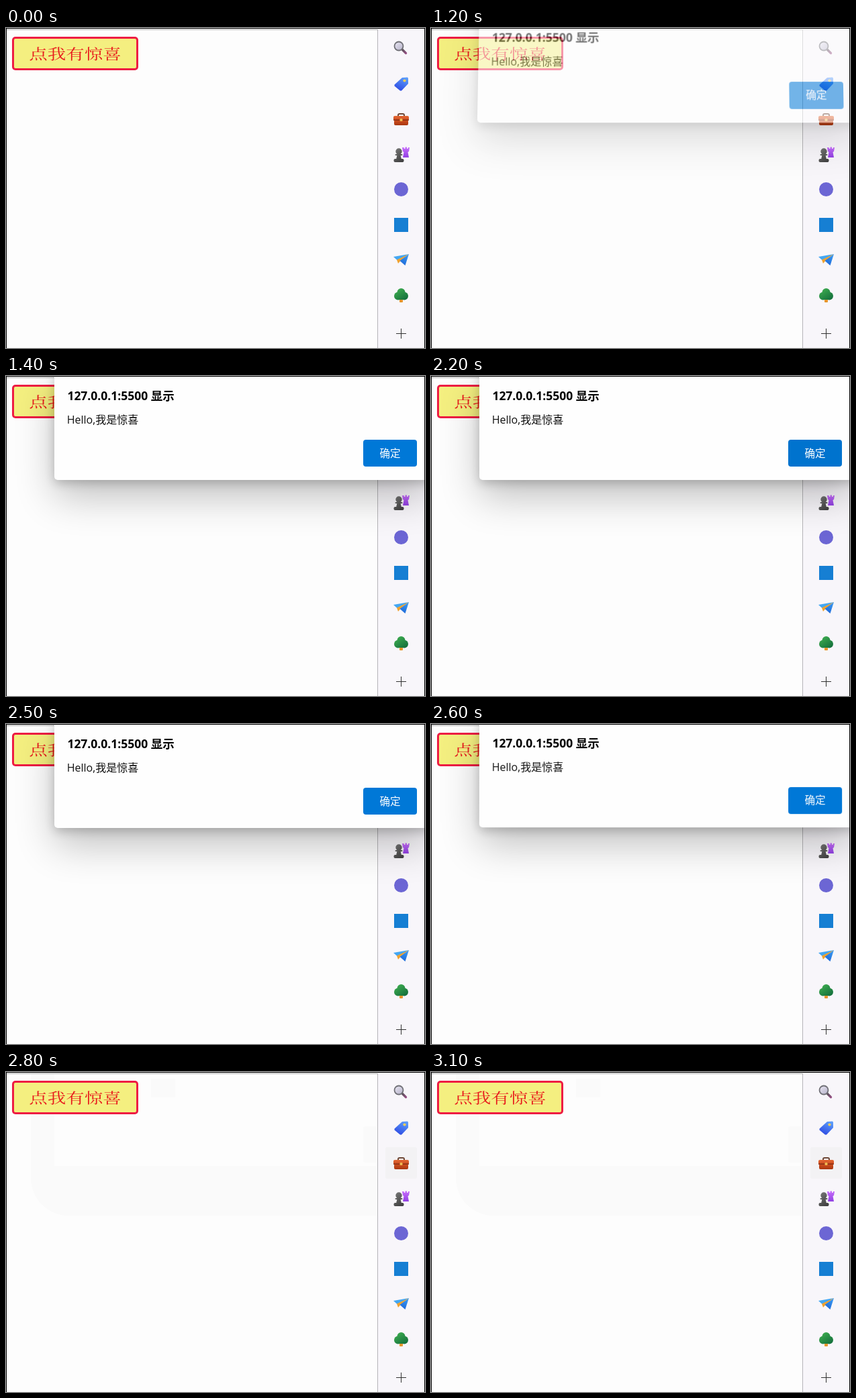
Animation of 624 by 477 pixels, one loop 4.2 s. Source, as an HTML page with a canvas:

```html
<!DOCTYPE html>
<html lang="zh">
<head>
<meta charset="utf-8">
<title>Alert</title>
<style>
  html, body { margin: 0; width: 100%; height: 100%; overflow: hidden; }
  #stage { position: relative; width: 624px; height: 477px; overflow: hidden; }
  canvas { position: absolute; left: 0; top: 0; }
  #dialog {
    position: absolute; left: 72px; top: -6px; width: 560px; height: 161px;
    border-radius: 5px; background: #fefefe; transform-origin: 50% 0;
    box-shadow: 0 25.6px 57.6px rgba(0,0,0,.24), 0 4.8px 14.4px rgba(0,0,0,.2);
  }
  #dialog svg { display: block; }
  #dialog text { font-family: "Open Sans", "Noto Sans CJK SC", "Noto Sans CJK", sans-serif; }
  #frame {
    position: absolute; inset: 0; border: 1px solid #000; border-bottom: 0;
  }
</style>
</head>
<body>
<div id="stage">
  <canvas id="page" width="624" height="477"></canvas>
  <div id="dialog">
    <svg width="560" height="161" viewBox="72 -6 560 161">
      <text x="91.4" y="36" font-size="17.5" font-weight="700">127.0.0.1:5500 显示</text>
      <text x="90.7" y="71" font-size="16" fill="#111">Hello,我是惊喜</text>
      <rect id="ok" x="532" y="95" width="80" height="40" rx="4"/>
      <text x="572" y="120.5" font-size="15.5" fill="#fff" text-anchor="middle">确定</text>
    </svg>
  </div>
  <div id="frame"></div>
</div>
<script>
const LOOP = 4200;
const ctx = document.getElementById('page').getContext('2d');
const dialog = document.getElementById('dialog');
const ok = document.getElementById('ok');

// Dialog poses: start time, opacity, lift (1 = raised and tilted)
const poses = [
  [0, 0, 1], [1200, .55, 1], [1300, .98, .06], [1400, 1, 0],
  [2600, 1, .06], [2700, .47, .93], [2800, 0, 1]
];

function box(x, y, w, h, fill, r = 0) {
  ctx.fillStyle = fill;
  ctx.beginPath();
  ctx.roundRect(x, y, w, h, r);
  ctx.fill();
}
function dot(x, y, r, fill) {
  ctx.fillStyle = fill;
  ctx.beginPath();
  ctx.arc(x, y, r, 0, Math.PI * 2);
  ctx.fill();
}
function poly(fill, ...p) {
  ctx.fillStyle = fill;
  ctx.beginPath();
  for (let i = 0; i < p.length; i += 2) ctx.lineTo(p[i], p[i + 1]);
  ctx.closePath();
  ctx.fill();
}
function line(color, width, ...p) {
  ctx.strokeStyle = color;
  ctx.lineWidth = width;
  ctx.beginPath();
  for (let i = 0; i < p.length; i += 2) ctx.lineTo(p[i], p[i + 1]);
  ctx.stroke();
}
function fade(x1, y1, x2, y2, a, b) {
  const g = ctx.createLinearGradient(x1, y1, x2, y2);
  g.addColorStop(0, a);
  g.addColorStop(1, b);
  return g;
}

function search() {
  ctx.lineCap = 'round';
  line(fade(590, 32, 597, 39, '#555058', '#a3508c'), 3.4, 590.5, 32.5, 595.5, 37.5);
  ctx.lineCap = 'butt';
  dot(585, 27, 7.4, '#707076');
  dot(585, 27, 5.6, fade(580, 22, 590, 33, '#e4e1ee', '#b9b5cc'));
}

function tag() {
  ctx.lineJoin = 'round';
  const blue = fade(594, 74, 584, 94, '#5b9cfa', '#2d48e2');
  poly(blue, 590, 74, 598, 73.5, 599, 75, 599, 83, 589, 93.5, 587, 93.5, 578.5, 86.5, 578.5, 84.5);
  dot(593.5, 78.5, 2.1, '#f5cf58');
}

function toolbox() {
  ctx.strokeStyle = '#6d4736';
  ctx.lineWidth = 2;
  ctx.beginPath();
  ctx.roundRect(584, 128, 9, 7, 2);
  ctx.stroke();
  box(577, 131, 23, 7, fade(0, 131, 0, 138, '#e56a35', '#c9471c'), 2);
  box(578, 137, 21, 8, fade(0, 137, 0, 145, '#d2501f', '#a93711'), 2);
  box(577, 136.5, 23, 1.3, '#7d2b12');
  box(586.5, 135, 4, 4, '#f0b851', 1);
}

function chess() {
  const violet = fade(0, 178, 0, 195, '#c56bfa', '#8a3be0');
  poly(violet, 590, 178, 592.5, 178, 593, 180, 594.5, 180, 594.5, 177.5, 597, 177.5, 597, 180,
    598.5, 180, 599, 178, 601, 178, 600, 184, 598.5, 185, 600, 193, 591, 193, 592.5, 185, 591, 184);
  const gray = fade(578, 180, 592, 200, '#777', '#3c3c3c');
  dot(585, 184, 4.7, gray);
  box(579.5, 188, 11, 2, gray, 1);
  poly(gray, 582.5, 189, 587.5, 189, 589, 196, 581, 196);
  box(577.5, 195, 15, 5, gray, 2);
}

function plane() {
  poly('#43a7f3', 600, 337, 577, 341, 583, 346.5);
  poly('#f0a22f', 600, 337, 582, 345.5, 584, 351, 588, 346.5);
  poly(fade(599, 338, 590, 354, '#3c9df2', '#1c66d8'), 600, 337, 586.5, 347, 594.5, 354);
}

function tree() {
  box(586, 401, 5, 8, '#e6962c', 1);
  const leaf = fade(582, 388, 594, 406, '#3fae50', '#14703c');
  dot(588.5, 394, 6, leaf);
  dot(584, 399.5, 6, leaf);
  dot(593, 399.5, 6, leaf);
  box(584, 397, 9, 8, leaf);
}

function sidebar(hover) {
  box(554, 1, 70, 476, '#f8f6fa');
  box(553, 2, 1, 475, '#b6b5b8');
  if (hover) box(565, 112, 47, 47, '#f3f2f4', 3);
  search();
  tag();
  toolbox();
  chess();
  dot(588.5, 240.5, 10.5, '#6c66d4');
  box(578, 283, 21, 21, '#167fd3');
  plane();
  tree();
  line('#333', 1, 581, 455.5, 596, 455.5);
  line('#333', 1, 588.5, 448, 588.5, 463);
}

// Faint trace left on the page once the dialog goes
function trace() {
  box(37, 3, 600, 211, '#fafafa', [0, 0, 0, 56]);
  box(72, 3, 481, 137, '#fdfdfd');
  box(216, 10, 36, 28, '#fafafa');
  box(532, 81, 21, 54, '#fafafa', 3);
}

function surpriseButton() {
  box(9, 13, 188, 50, '#ee1c43', 5);
  box(12, 16, 182, 44, '#f4ef80', 2);
  ctx.save();
  ctx.translate(103, 38.5);
  ctx.scale(1, .76); // flat clerical-script proportions
  ctx.font = '500 27.5px LiSu, "Noto Serif CJK SC", "Noto Sans CJK SC", "Noto Sans CJK", serif';
  ctx.textAlign = 'center';
  ctx.fillStyle = '#e8191c';
  ctx.fillText('点我有惊喜', 0, 10.4);
  ctx.restore();
}

function render(t) {
  box(0, 0, 624, 477, '#fdfdfd');
  box(1, 2, 553, 1, '#b0b0b0');
  if (t >= 2700) trace();
  surpriseButton();
  sidebar(t >= 2800);

  const [, alpha, lift] = poses.findLast(p => p[0] <= t);
  dialog.style.opacity = alpha;
  dialog.style.transform = lift
    ? `translateY(${-15.5 * lift}px) perspective(600px) rotateX(${2.4 * lift}deg)`
    : 'none';
  ok.setAttribute('fill', t >= 2200 && t < 2500 ? '#0073ce' : '#0078d7');
}

const start = performance.now();
function tick() {
  render((performance.now() - start) % LOOP);
  requestAnimationFrame(tick);
}
tick();
</script>
</body>
</html>
```
